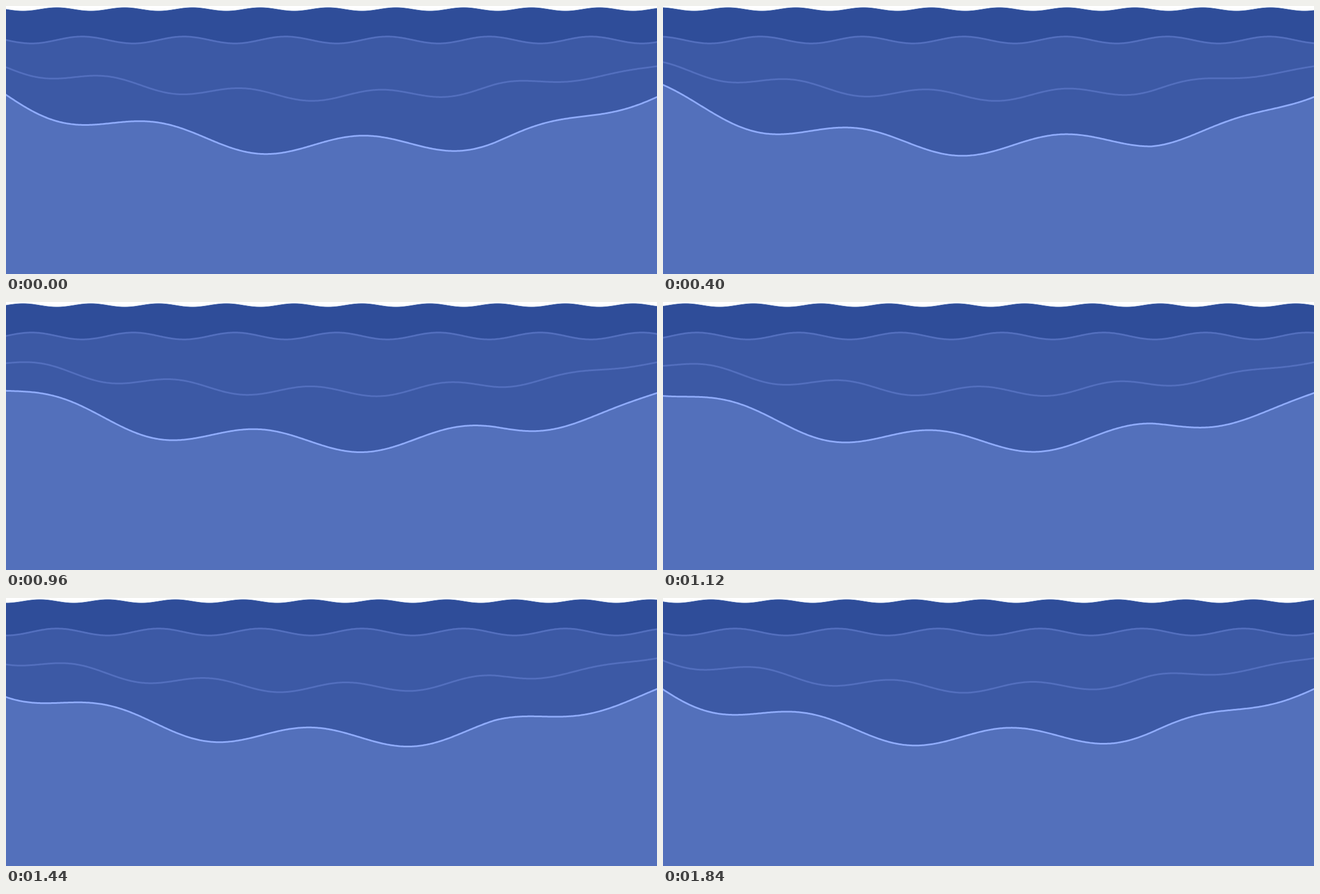
Animation of 1165x481 px, one loop 1.92 s. Source, as an HTML page with a canvas:

```html
<!DOCTYPE html>
<html lang="en">
<head>
<meta charset="utf-8">
<title>Waves</title>
<style>
  html, body { margin: 0; width: 100%; height: 100%; overflow: hidden; background: #fff; }
  canvas { display: block; }
</style>
</head>
<body>
<canvas id="stage" width="1165" height="481"></canvas>
<script>
const ctx = document.getElementById('stage').getContext('2d');
const W = 1165, H = 481, LOOP = 1920, STEP = 80;
const FADE_START = W * 0.75;

// level(v) is the resting height, with v running from -1 (left) to 1 (right).
const waves = [
  { cycles: 9.6, amp: 3.1, level: () => 6, fill: '#2f4d99', line: '#3c5fa9', width: 1 },
  { cycles: 6.4, amp: 6.2, level: () => 61, fill: '#3c59a5', line: '#536fbe', width: 3 },
  { cycles: 4.8, amp: 9.4, level: v => 161 - 0.8 * v - 57 * v ** 2 + 5 * v ** 4,
    fill: '#3c59a5', line: '#536fbe', width: 3, fades: true },
  { cycles: 3.2, amp: 18.4, level: v => 251.3 + 4.4 * v - 70 * v ** 2 - 20 * v ** 4 - 2.4 * v ** 7,
    fill: '#5370bb', line: '#8fabfa', width: 3, fades: true }
];

function heightAt(wave, x, progress) {
  const fade = wave.fades ? Math.min(1, (W - x) / (W - FADE_START)) : 1;
  const swing = Math.sin(2 * Math.PI * (wave.cycles * x / W - progress));
  return wave.level(2 * x / W - 1) + wave.amp * fade * swing;
}

function drawWave(wave, progress) {
  const crest = new Path2D();
  for (let x = -4; x <= W + 4; x += 2) crest.lineTo(x, heightAt(wave, x, progress));

  const body = new Path2D(crest);
  body.lineTo(W + 4, H);
  body.lineTo(-4, H);
  ctx.fillStyle = wave.fill;
  ctx.fill(body);

  ctx.strokeStyle = wave.line;
  ctx.lineWidth = wave.width;
  ctx.stroke(crest);
}

function render() {
  const time = Math.floor(performance.now() % LOOP / STEP) * STEP;
  ctx.clearRect(0, 0, W, H);
  waves.forEach(wave => drawWave(wave, time / LOOP));
  requestAnimationFrame(render);
}
render();
</script>
</body>
</html>
```
